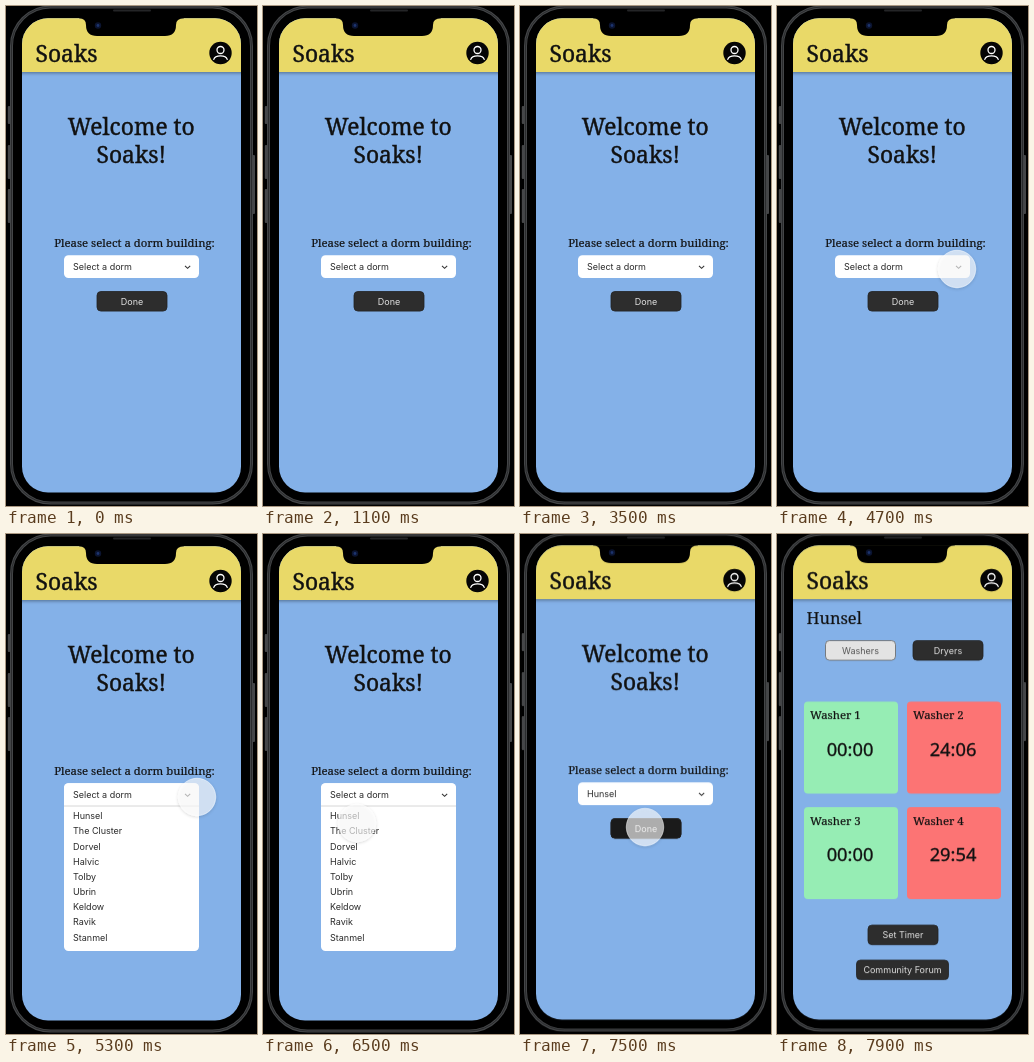
An HTML page for the animation above (8000 ms loop, 251 px wide and 500 px high).

```html
<!DOCTYPE html>
<html lang="en">
<head>
<meta charset="utf-8">
<title>Laundry prototype</title>
<style>
  html, body { margin: 0; width: 100%; height: 100%; overflow: hidden; background: #000; }
  svg { display: block; width: 100vw; height: 100vh; }
  text { font-family: Inter, sans-serif; font-size: 9px; fill: #2a2a2a; }
  .serif { font-family: "Noto Serif", serif; font-weight: 500; fill: #111; stroke: #111; stroke-width: .2px; }
  .title { font-size: 22.8px; stroke-width: .4px; }
  .time { font-family: "Noto Sans", sans-serif; font-size: 18.3px; font-weight: 500; fill: #111; stroke: #111; stroke-width: .3px; }
  .mid { text-anchor: middle; }
</style>
</head>
<body>
<svg viewBox="0 0 251 500">
  <defs>
    <clipPath id="screen"><rect x="16" y="12.3" width="219" height="474.2" rx="26"/></clipPath>
    <filter id="soft" x="-20%" y="-20%" width="140%" height="150%">
      <feDropShadow dx="0" dy="1.5" stdDeviation="1.5" flood-opacity=".32"/>
    </filter>
    <filter id="faint" x="-20%" y="-20%" width="140%" height="150%">
      <feDropShadow dx="0" dy="1" stdDeviation="1.5" flood-opacity=".22"/>
    </filter>
  </defs>

  <g id="phone">
    <g fill="#454648">
      <rect x="1.8" y="100" width="2.5" height="18" rx="1"/>
      <rect x="1.8" y="139" width="2.5" height="34" rx="1"/>
      <rect x="1.8" y="183" width="2.5" height="34" rx="1"/>
      <rect x="246.5" y="149" width="2.5" height="59" rx="1"/>
    </g>
    <rect x="5.5" y="1" width="240" height="496" rx="39" fill="#000" stroke="#434547" stroke-width="3"/>
    <rect x="5.5" y="1" width="240" height="496" rx="39" fill="none" stroke="#2a2b2d" stroke-width="1"/>
    <rect x="107" y="3.6" width="38" height="2" rx="1" fill="#242527"/>

    <g clip-path="url(#screen)">
      <rect x="16" y="9" width="219" height="478" fill="#84b1e8"/>
      <rect x="10" y="5" width="231" height="61" fill="#e9d968" filter="url(#soft)"/>
      <text class="serif title" x="29.5" y="56">Soaks</text>
      <circle cx="214.5" cy="47" r="11.2" fill="#050505"/>
      <g fill="none" stroke="#fff" stroke-width="1.3" stroke-linecap="round">
        <circle cx="214.5" cy="44" r="3.5"/>
        <path d="M207.8 53.3C209 48.8 220 48.8 221.2 53.3"/>
      </g>

      <g id="welcome">
        <g class="mid">
          <text class="serif title" x="125.3" y="128.5">Welcome to</text>
          <text class="serif title" x="125.3" y="156.5">Soaks!</text>
          <text class="serif" x="128.5" y="241" style="font-size:11.35px">Please select a dorm building:</text>
        </g>
        <g id="done"></g>
        <g id="doneHover"></g>
        <rect x="58" y="249.3" width="135" height="22.7" rx="4.5" fill="#fff"/>
        <g id="menu">
          <rect x="58" y="249.3" width="135" height="167.7" rx="4.5" fill="#fff"/>
          <path d="M58 272H193" stroke="#ccc" stroke-width=".8"/>
        </g>
        <text id="prompt" x="67" y="264.3">Select a dorm</text>
        <text id="choice" x="67" y="264.3"></text>
        <path d="M179 259.8L181.6 262.3L184.2 259.8" fill="none" stroke="#333" stroke-width="1.1"/>
      </g>

      <g id="machines"></g>

      <g id="touch">
        <circle r="18.7" fill="#fff" fill-opacity=".62" stroke="#fff" stroke-opacity=".5" filter="url(#faint)"/>
      </g>
    </g>

    <path d="M73 11.5H178V12.3Q170 12.3 170 19Q170 30 159 30H91Q80 30 80 19Q80 12.3 73 12.3Z" fill="#000"/>
    <circle cx="92" cy="19.5" r="3.2" fill="#0b1430"/>
    <circle cx="92" cy="19.5" r="1.4" fill="#1d346e"/>
  </g>
</svg>

<script>
const LOOP = 8000;
const OPEN = 5000, CHOSEN = 6700, HOVER = 7100, NEXT = 7700;
const dorms = ["Hunsel", "The Cluster", "Dorvel", "Halvic", "Tolby", "Ubrin", "Keldow", "Ravik", "Stanmel"];
const $ = id => document.getElementById(id);

function add(parent, tag, attrs, content = "") {
  const node = document.createElementNS("http://www.w3.org/2000/svg", tag);
  for (const name in attrs) node.setAttribute(name, attrs[name]);
  node.textContent = content;
  parent.append(node);
}

function button(parent, x, y, width, label, fill = "#2d2d2d", ink = "#e0e0e0", edge = "#232323") {
  add(parent, "rect", { x, y, width, height: 19.6, rx: 4, fill, stroke: edge, "stroke-width": .8 });
  add(parent, "text", { x: x + width / 2, y: y + 13.2, class: "mid", style: `fill:${ink}` }, label);
}

function machine(number, time, x, y, fill) {
  const page = $("machines");
  add(page, "rect", { x, y, width: 94, height: 92, rx: 4, fill });
  add(page, "text", { x: x + 6, y: y + 17.5, class: "serif", style: "font-size:11.4px" }, "Washer " + number);
  add(page, "text", { x: x + 46, y: y + 54, class: "time mid" }, time);
}

button($("done"), 91, 285.5, 70, "Done");
button($("doneHover"), 91, 285.5, 70, "Done", "#1a1a1a");
dorms.forEach((name, i) => add($("menu"), "text", { x: 67, y: 285.3 + i * 15.15 }, name));
$("choice").textContent = dorms[0];

const page = $("machines");
add(page, "text", { x: 29.5, y: 91, class: "serif", style: "font-size:16.4px" }, dorms[0]);
button(page, 48.5, 107.5, 70, "Washers", "#e3e3e3", "#555", "#666");
button(page, 136, 107.5, 70, "Dryers");
machine(1, "00:00", 27, 168.5, "#96edb4");
machine(2, "24:06", 130, 168.5, "#fc7474");
machine(3, "00:00", 27, 274, "#96edb4");
machine(4, "29:54", 130, 274, "#fc7474");
button(page, 91, 392, 70, "Set Timer");
button(page, 79.5, 427, 92, "Community Forum");

function play(id, frames) {
  const animation = $(id).animate(frames, { duration: LOOP, iterations: Infinity });
  animation.startTime = 0;
}

function showBetween(id, from, to) {
  const steps = [[0, from === 0], [from, true], [to, false], [LOOP, to === LOOP]];
  play(id, steps.map(([t, on]) => ({
    offset: t / LOOP, opacity: +on, easing: "steps(1, end)"
  })));
}

showBetween("welcome", 0, NEXT);
showBetween("machines", NEXT, LOOP);
showBetween("menu", OPEN, CHOSEN);
showBetween("prompt", 0, CHOSEN);
showBetween("choice", CHOSEN, LOOP);
showBetween("doneHover", HOVER, LOOP);

// The whole phone drifts up slightly near the end
play("phone", [
  { offset: 0, transform: "translateY(0)" },
  { offset: CHOSEN / LOOP, transform: "translateY(0)" },
  { offset: HOVER / LOOP, transform: "translateY(-.9px)" },
  { offset: 1, transform: "translateY(-.9px)" }
]);

// time, x, y, opacity
const touchPath = [
  [0, 180, 263, 0], [4100, 180, 263, 0], [4300, 180, 263, 1], [4900, 180, 263, 1],
  [5300, 191, 263, 1], [5700, 191, 263, 1], [6300, 94, 289, 1], [6800, 94, 289, 1],
  [7200, 125, 294, 1], [7690, 125, 294, 1], [7700, 125, 294, 0], [LOOP, 125, 294, 0]
];
play("touch", touchPath.map(([t, x, y, opacity]) => ({
  offset: t / LOOP, transform: `translate(${x}px, ${y}px)`, opacity, easing: "ease-in-out"
})));
</script>
</body>
</html>
```
